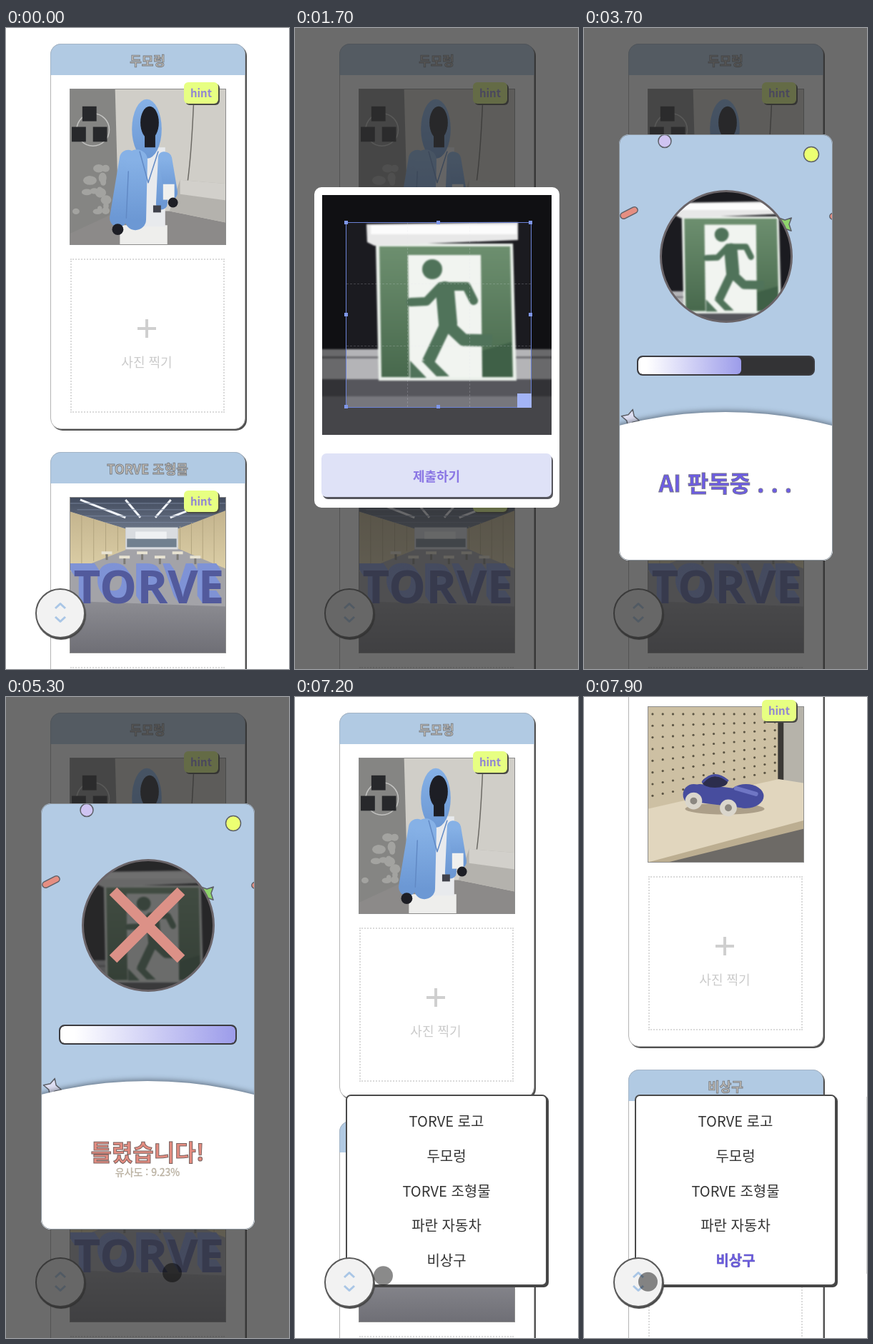
Animation, 396 px wide and 898 px high, one loop 8000 ms. Source, as an HTML page:

```html
<!DOCTYPE html>
<html lang="ko">
<head>
<meta charset="utf-8">
<title>사진 미션</title>
<style>
  html, body { margin: 0; width: 100%; height: 100%; overflow: hidden; background: #fff; }
  * { box-sizing: border-box; }
  body { font-family: "Noto Sans CJK KR", "Noto Sans KR", "Noto Sans CJK", "Noto Sans CJK JP", "Noto Sans", sans-serif; }
  #stage { position: relative; width: 396px; height: 898px; overflow: hidden; background: #fff; }
  #stage div, #stage svg { position: absolute; }
  #stage .t { line-height: 1; white-space: nowrap; transform: translate(-50%, -56%); }
  .card { left: 62px; width: 273px; height: 540px; border-radius: 15px; background: #fff;
    border: 1px solid #b4b4b4; box-shadow: 2px 2px 0 #505050; }
  .head { left: -1px; top: -1px; width: 273px; height: 44px; border-radius: 15px 15px 0 0;
    background: #b1cae3; border: 1px solid #a3b4c6; border-bottom: 0; }
  .title { left: 135px; top: 23px; font-size: 18px; font-weight: 700; color: #c4bfb8; -webkit-text-stroke: .9px #777b80; }
  .photo { left: 26px; top: 62px; width: 219px; height: 219px; border: 1px solid #8c8c8c; }
  .hint { left: 186px; top: 53px; width: 48px; height: 30px; border-radius: 6px; background: #e7ff82;
    box-shadow: 2px 2px 0 #4a4a45; }
  .hint .t { left: 24px; top: 15px; font-size: 15px; font-weight: 700; color: #9186d2; }
  .slot { left: 27px; top: 300px; width: 216px; height: 216px; border: 2px dotted #dadada; }
  .plus { left: 121px; top: 385px; width: 26px; height: 26px;
    background: linear-gradient(#cfcfcf, #cfcfcf) center / 100% 4px no-repeat,
      linear-gradient(#cfcfcf, #cfcfcf) center / 4px 100% no-repeat; }
  .take { left: 134px; top: 445px; font-size: 18px; color: #cbcbcb; }
  #menu { left: 71px; top: 557px; width: 282px; height: 268px; border: 2px solid #4a4a4a; border-radius: 7px;
    background: #fff; box-shadow: 2px 2px 0 #444; }
  #menu .t { left: 139px; font-size: 20px; color: #333; }
  #menu .on { font-weight: 700; color: #6a5be0; -webkit-text-stroke: .4px #5a50a8; }
  #fab { left: 41px; top: 785px; width: 70px; height: 70px; border-radius: 50%; background: #f2f2f2;
    border: 2px solid #5a5a5a; box-shadow: 1px 2px 1px #444; }
  #bar { left: 395px; top: 560px; width: 1px; height: 248px; background: #d5d5d5; }
  #dim { inset: 0; background: rgba(45, 45, 45, .7); }
  #cropper { left: 27px; top: 223px; width: 343px; height: 449px; border-radius: 10px; background: #fff; }
  #shot { left: 11px; top: 11px; width: 321px; height: 336px; overflow: hidden; }
  #crop { left: 33px; width: 260px; height: 260px; border: 1px solid #6b82d6; box-shadow: 0 0 0 400px rgba(0, 0, 0, .42); }
  #crop i { position: absolute; width: 5px; height: 5px; margin: -3px; background: #7f97ea; }
  #crop i:last-of-type { width: 20px; height: 20px; margin: -19px; background: #a3b4f6; }
  #crop b { position: absolute; border: 0 dashed rgba(225, 225, 235, .2); }
  #send { left: 10px; top: 373px; width: 322px; height: 61px; border-radius: 7px; background: #dfe2f7;
    box-shadow: 2px 3px 0 #55555c; }
  #send .t { left: 161px; top: 32px; font-size: 18px; font-weight: 700; color: #8a76e4; }
  #judge { left: 49px; top: 149px; width: 299px; height: 597px; border-radius: 14px; overflow: hidden;
    background: #b3cbe4; }
  #judge::after { content: ""; position: absolute; inset: 0; border: 1px solid #8d959d; border-radius: 14px; }
  #disc { left: 58px; top: 79px; width: 184px; height: 184px; border-radius: 50%; overflow: hidden; }
  #ring { left: 57px; top: 78px; width: 186px; height: 186px; border: 3px solid #6a6468; border-radius: 50%; }
  #hill { left: -445px; top: 389px; width: 1188px; height: 1188px; border-radius: 50%; background: #fff;
    box-shadow: 0 -2px 7px rgba(40, 50, 60, .55); }
  #track { left: 25px; top: 310px; width: 249px; height: 28px; border-radius: 8px; border: 2px solid #3c3c40;
    background: #333335; overflow: hidden; }
  #fill { height: 24px; border-radius: 6px; background: linear-gradient(90deg, #fff 8%, #9c9cea); }
  #wait, #wrong { left: 149px; top: 489px; font-size: 32px; font-weight: 700; }
  #wait { color: #6c5ce4; -webkit-text-stroke: .9px #77758a; }
  #wrong { color: #e48c80; -webkit-text-stroke: 1px #77615e; }
  #score { left: 149px; top: 517px; font-size: 14px; color: #c4b9a6; -webkit-text-stroke: .3px #a8a195; }
  #dot { width: 27px; height: 27px; margin: -13.5px; border-radius: 50%; background: rgba(0, 0, 0, .46); }
</style>
</head>
<body>
<div id="stage"></div>
<script>
const LOOP = 8000, STEP = 100;
const PITCH = 572, SCROLL_END = 3 * PITCH;
const BRAND = "TORVE", MASCOT = "두모렁";

const range = (n, f) => Array.from({ length: n }, (_, i) => f(i)).join("");
const shape = (fill, d) => `<path fill="${fill}" d="${d}"/>`;
const rect = (fill, x, y, w, h) => `<rect fill="${fill}" x="${x}" y="${y}" width="${w}" height="${h}"/>`;
const oval = (fill, x, y, rx, ry = rx, more = "") =>
  `<ellipse fill="${fill}" cx="${x}" cy="${y}" rx="${rx}" ry="${ry}" ${more}/>`;
const limb = (color, w, d, cap = "round") =>
  `<path d="${d}" fill="none" stroke="${color}" stroke-width="${w}" stroke-linecap="${cap}" stroke-linejoin="round"/>`;
const soft = (blur, art) => `<g style="filter:blur(${blur}px)">${art}</g>`;
const ground = color => rect(color, -9, -9, 360, 360);

function random(seed) {
  return () => (seed = seed * 16807 % 2147483647) / 2147483647;
}

const gradient = (id, top, bottom) => `<linearGradient id="${id}" x2="0" y2="1">
  <stop stop-color="${top}"/><stop offset="1" stop-color="${bottom}"/></linearGradient>`;
const gradients = gradient("panel", "#6d8f6f", "#48694d") + gradient("carpet", "#8d8d93", "#6b6b72")
  + gradient("jacket", "#86b1e6", "#6c98d4") + gradient("ceiling", "#3a4356", "#6a7486")
  + gradient("wood", "#c3b38d", "#ddd0a8");

function exitSign() {
  const green = "#50735a";
  return soft(1.3, ground("#1b1b20")
    + rect("#b4b4b7", -9, 216, 340, 42) + rect("#77777b", -9, 226, 340, 3)
    + rect("#56565c", -9, 258, 340, 90) + rect("#77777d", -9, 282, 340, 60)
    + shape("#e9efe9", "M75 68H267L272 260H79Z")
    + shape("url(#panel)", "M80 72H263L267 255H83Z")
    + shape("#f1f4f0", "M120 84H222L224 256H122Z")
    + shape("#3f6047", "M224 218L265 206V255H224Z")
    + shape("#e8e8e8", "M62 41L274 38V63L73 71 63 66Z") + rect("#fcfcfc", 68, 42, 204, 13)
    + oval(green, 154, 104, 14)
    + limb(green, 26, "M172 134L176 180")
    + limb(green, 12, "M166 128L146 149 124 150M176 128L202 128 212 148")
    + limb(green, 17, "M172 184L148 234M180 186L198 203 238 204", "butt")
    + shape(green, "M139 232H156L178 254H160ZM123 232L146 256H123Z"));
}

function mannequin() {
  const next = random(7);
  const blue = "url(#jacket)", black = "#1d1e25";
  return soft(.8, ground("#d0cec8")
    + shape("#858583", "M-9 -9H63L68 175-9 212Z")
    + shape("#8c8a89", "M-9 208L68 172H140L228 190V228H-9Z")
    + shape("#b4b2ad", "M155 128L228 134V190L140 172Z") + shape("#d2d0cb", "M155 128L228 134V158L155 148Z")
    + limb("#6b6964", 1.5, "M174 22Q171 90 166 128")
    + oval("none", 32, 57, 23, 23, `stroke="#c3c3c1" stroke-width="1.5"`)
    + range(3, i => rect("#27282b", 2 + i * 15, i % 2 ? 24 : 53, 20, 21))
    + range(16, () => oval("#a3a3a0", 8 + next() * 46, 108 + next() * 70, 3 + next() * 7, 3 + next() * 6))
    + rect("#eeeeec", 70, 192, 67, 40) + rect("#e8eaed", 94, 82, 40, 112)
    + oval(blue, 108, 56, 21, 42) + oval(black, 112, 47, 13, 23) + rect(black, 105, 58, 15, 24)
    + limb(blue, 25, "M82 98L68 182") + limb(blue, 30, "M94 100L92 184") + limb(blue, 16, "M132 96L129 162")
    + limb(blue, 19, "M134 98L142 146") + limb("#6189c4", 1.5, "M82 116L79 182M98 88L110 132 124 88")
    + rect("#40424b", 117, 164, 11, 10) + rect("#f0f0ee", 131, 134, 16, 22)
    + oval(black, 145, 160, 7) + oval(black, 67, 198, 8));
}

function hall() {
  const depth = 11;
  const sculpture = i => `<text x="${104 + i * .7}" y="${139 + i}" text-anchor="middle" font-size="66"
    font-weight="900" font-family="Noto Sans, Open Sans, sans-serif"
    fill="${i < depth - 1 ? "#7f93d6" : "#525a9c"}">${BRAND}</text>`;
  return soft(.7, ground("#a3a3a8")
    + shape("url(#ceiling)", "M-9 -9H228V18L152 44H78L-9 17Z")
    + range(4, i => limb("#f1f4f9", 3, `M${14 + i * 64} 3L${78 + i * 21} 28`, "butt"))
    + range(4, i => limb("#77829a", 1, `M${i * 10} ${8 + i * 9}H${219 - i * 10}`))
    + shape("url(#wood)", "M-9 17L78 44V74L-9 108ZM228 15L152 44V72L228 104Z")
    + range(4, i => limb("#b3a580", 1, `M${16 + i * 17} ${26 + i * 5}v${70 - i * 12}M${203 - i * 16} ${26 + i * 5}v${68 - i * 12}`))
    + rect("#d9dce0", 78, 42, 74, 31) + rect("#71808f", 80, 58, 70, 12) + rect("#eff1f3", 92, 48, 44, 10)
    + range(6, i => rect("#e8e3d2", 44 + i * 25, 76 + i % 2 * 6, 15, 4) + rect("#7d7b76", 50 + i * 25, 80 + i % 2 * 6, 3, 8))
    + shape("url(#carpet)", "M-9 146L228 154V228H-9Z")
    + range(depth, sculpture));
}

function toyCar() {
  const blue = "#474d9e";
  return soft(.7, ground("#b6b3aa")
    + shape("#cdc0a3", "M-9 -9H186V104L-9 150Z")
    + range(104, n => {
      const c = n % 13, r = Math.floor(n / 13);
      return oval("#5b5443", 6 + c * 14.4, 10 + r * 16.5 - c * r * .42, 1.6);
    })
    + rect("#3b3936", 183, -9, 8, 118)
    + shape("#6d6a66", "M-9 228L228 150V228Z") + shape("#bcae91", "M-9 200L228 140V170L30 219-9 228Z")
    + shape("#e1d6be", "M-9 146L184 102 228 109V158L-9 222Z")
    + oval("#ac9f89", 108, 144, 56, 8)
    + oval(blue, 64, 124, 15) + oval(blue, 138, 126, 25, 17) + limb(blue, 26, "M72 122L136 130")
    + oval("#2c2d4c", 94, 106, 18, 8) + limb(blue, 3, "M77 106Q92 88 112 104") + limb("#6f76c4", 6, "M124 115L152 123")
    + [64, 113].map(x => oval("#dad6cc", x, 120 + x / 5, 12) + oval("#8b8780", x, 120 + x / 5, 5)).join(""));
}

const photos = [
  [MASCOT, mannequin(), 219],
  [BRAND + " 조형물", hall(), 219],
  ["파란 자동차", toyCar(), 219],
  ["비상구", exitSign(), 321],
];
const menuItems = [BRAND + " 로고", ...photos.map(p => p[0])];

const card = ([title, art, size], i) => `
  <div class="card" style="top:${22 + i * PITCH}px">
    <div class="head"></div><div class="t title">${title}</div>
    <svg class="photo" viewBox="0 0 ${size} ${size}">${art}</svg>
    <div class="hint"><div class="t">hint</div></div>
    <div class="slot"></div><div class="plus"></div>
    <div class="t take">사진 찍기</div>
  </div>`;

// Eight crop handles: every cell of a 3 × 3 grid except the middle.
const handles = range(9, i => i === 4 ? "" : `<i style="left:${i % 3 * 50}%;top:${Math.floor(i / 3) * 50}%"></i>`);

const ink = `stroke="#5d6068" stroke-width="1.5" stroke-linejoin="round"`;
function star(x, y, turn, fill) {
  const d = range(8, i => {
    const a = turn + i * Math.PI / 4, r = i % 2 ? 6 : 13;
    return `${i ? "L" : "M"}${x + r * Math.cos(a)} ${y + r * Math.sin(a)}`;
  });
  return `<path d="${d}Z" fill="${fill}" ${ink}/>`;
}
const pill = (x, y) => `<rect x="${x - 13}" y="${y - 4.5}" width="26" height="9" rx="4.5" fill="#e58e82" ${ink}
  transform="rotate(-27 ${x} ${y})"/>`;
const confetti = oval("#cfc4f2", 64, 9.5, 9, 9, ink) + oval("#ecff72", 269, 28, 10.5, 10.5, ink)
  + pill(14, 110) + pill(307, 111) + star(232, 126, .8, "#8fd46c") + star(16, 398, .25, "#dfe0f4");

stage.innerHTML = `
  <svg width="0" height="0"><defs>${gradients}</defs></svg>
  <div id="page">${photos.map(card).join("")}</div>
  <div id="bar"></div>
  <div id="menu">${menuItems.map((s, i) => `<div class="t" style="top:${36 + i * 48.8}px">${s}</div>`).join("")}</div>
  <div id="fab"><svg width="66" height="66">${limb("#a9c6e6", 3, "M26 26l7-6.500 7 6.500M26 38l7 6.500 7-6.500", "butt")}</svg></div>
  <div id="dim"></div>
  <div id="cropper">
    <div id="shot">
      <svg width="321" height="336">${exitSign()}</svg>
      <div id="crop">
        <b style="inset:0 33%;border-width:0 1px"></b><b style="inset:33% 0;border-width:1px 0"></b>${handles}
      </div>
    </div>
    <div id="send"><div class="t">제출하기</div></div>
  </div>
  <div id="judge">
    <svg width="299" height="597">${confetti}</svg>
    <div id="disc">
      <svg width="184" height="184" viewBox="33 17 260 260">${exitSign()}</svg>
      <svg id="cross" width="184" height="184">${rect("rgba(45,45,45,.68)", 0, 0, 184, 184)}
        ${limb("#dc9187", 15, "M43 44l95 95m0-95l-95 95", "butt")}</svg>
    </div>
    <div id="ring"></div>
    <div id="track"><div id="fill"></div></div>
    <div id="hill"></div>
    <div id="wait" class="t">AI 판독중 . . .</div>
    <div id="wrong" class="t">틀렸습니다!</div>
    <div id="score" class="t">유사도 : 9.23%</div>
  </div>
  <div id="dot"></div>`;

const $ = id => document.getElementById(id);
const part = (t, from, to) => Math.max(0, Math.min(1, (t - from) / (to - from)));
const show = (id, on) => { $(id).style.visibility = on ? "visible" : "hidden"; };

function pointer(t, drag) {
  if (t >= 2200 && t < 2800) return [214, 418 - drag];
  if (t === 2900) return [205, 628];
  if (t >= 5200 && t < 5400) return [232, 806];
  if (t < 6800) return null;
  // From the round button to the last menu row and back.
  const swing = Math.sin(Math.PI * part(t, 7000, 8000)) ** 2;
  return [76 + 136 * swing, 822 - 34 * swing];
}

function render(t) {
  const cropping = t >= 1700 && t < 3000;
  const judging = t >= 3000 && t < 5400;
  const done = judging && t >= 4400;
  const drag = 21 * part(t, 2200, 2600);
  const glide = (1 - Math.cos(Math.PI * part(t, 7500, 8128))) / 2;

  $("page").style.transform = `translateY(${-Math.round(SCROLL_END * glide)}px)`;
  show("bar", t >= 7800);
  show("menu", t >= 6900);
  $("menu").lastElementChild.classList.toggle("on", t >= 7500);
  show("dim", cropping || judging);
  show("cropper", cropping);
  $("crop").style.top = 38 - drag + "px";
  show("judge", judging);
  $("fill").style.width = 245 * part(t, 2900, 4260) + "px";
  show("wait", judging && !done);
  ["cross", "wrong", "score"].forEach(id => show(id, done));

  const at = pointer(t, drag);
  show("dot", at);
  if (at) $("dot").style.transform = `translate(${at[0]}px, ${at[1]}px)`;
}

const start = performance.now();
function tick(now) {
  const t = Math.max(0, now - start) % LOOP;
  render(Math.floor(t / STEP) * STEP);
  requestAnimationFrame(tick);
}
render(0);
requestAnimationFrame(tick);
</script>
</body>
</html>
```
